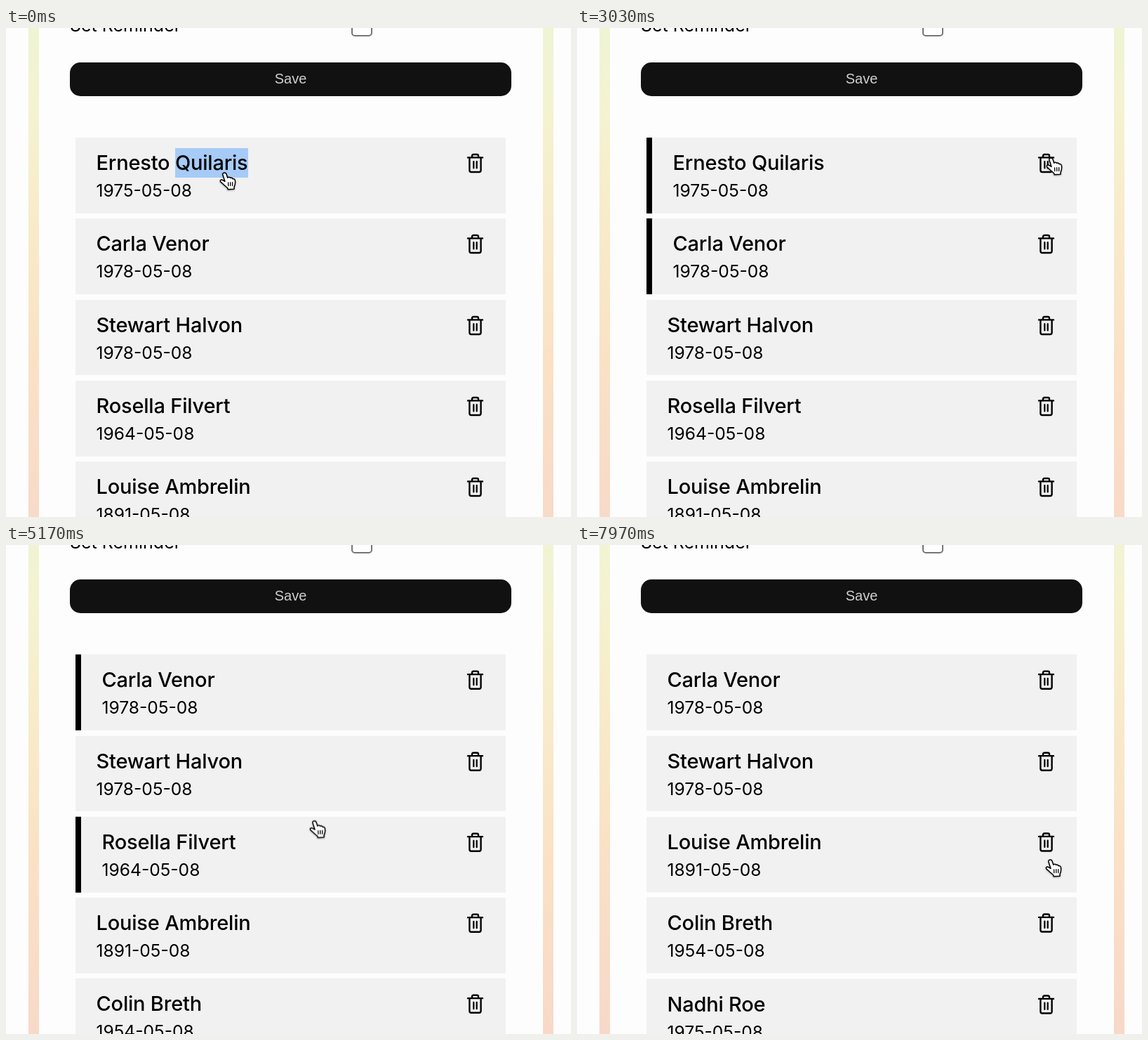
An HTML page for the animation above (8000 ms loop, 805 by 696 pixels).

```html
<!DOCTYPE html>
<html lang="en">
<head>
<meta charset="utf-8">
<title>Birthday list</title>
<style>
  html, body { margin: 0; width: 805px; height: 696px; overflow: hidden; }
  body { position: relative; background: #fdfdfd; color: #000; font-family: Inter, sans-serif; }
  body > * { position: absolute; }

  .strip {
    top: 0; width: 15.5px; height: 696px;
    background: linear-gradient(#eef4d4, #f4f3d1 12%, #f8eaca 33%, #fae1c6 53%, #f8dac8 77%, #f8d3c8) 0 0 / 100% 900px;
    animation: tint 8s step-end infinite;
  }
  .label { left: 91px; top: -22.5px; font-size: 25px; line-height: 36px; white-space: nowrap; }
  .box {
    left: 492px; top: -18px; width: 30px; height: 30px; box-sizing: border-box;
    border: 2px solid #767676; border-radius: 5px; background: #fff;
  }
  .save {
    left: 91px; top: 49px; width: 629px; height: 48px; border-radius: 15px;
    background: #111; color: #cfcfcf; text-align: center;
    font: 20px/47px "Liberation Sans", Arial, sans-serif;
  }

  .list { left: 98.5px; top: 156px; width: 613.5px; animation: shift1 8s step-end infinite; }
  .rest { animation: shift2 8s step-end infinite; }
  .card {
    position: relative; box-sizing: border-box; height: 107.75px; margin-bottom: 7.5px;
    padding-left: 30px; border-left: 0 solid #000; background: #f1f1f1;
    white-space: nowrap; overflow: hidden;
    animation: 8s step-end infinite;
  }
  .card b { display: block; padding-top: 15px; font-size: 29px; line-height: 42px; font-weight: 500; letter-spacing: -.2px; }
  .card i { display: block; margin-top: -1px; font-size: 24.6px; line-height: 38px; font-style: normal; }
  .card svg { position: absolute; right: 30px; top: 21px; width: 27px; height: 31px; }
  mark { display: inline-block; color: inherit; animation: deselect 8s step-end infinite; }

  .first { animation-name: on1, gone1; }
  .second { animation-name: on2; }
  .fourth { animation-name: on4, gone4; }

  .hand { left: 0; top: 0; width: 26px; height: 28px; overflow: visible; filter: drop-shadow(0 1px 1px #0005); animation: roam 8s linear infinite; }

  @keyframes tint {
    0% { background-position-y: 0; }
    41.62% { background-position-y: -25px; }
    93.74%, 100% { background-position-y: -50px; }
  }
  @keyframes shift1 { 0% { transform: none; } 41.62%, 100% { transform: translateY(-115.25px); } }
  @keyframes shift2 { 0% { transform: none; } 93.74%, 100% { transform: translateY(-115.25px); } }
  @keyframes gone1 { 0% { visibility: visible; } 41.62%, 100% { visibility: hidden; } }
  @keyframes gone4 { 0% { visibility: visible; } 93.74%, 100% { visibility: hidden; } }
  @keyframes on1 { 0% { border-left-width: 0; } .37%, 100% { border-left-width: 8px; } }
  @keyframes on2 { 0% { border-left-width: 0; } 23.37% { border-left-width: 8px; } 77.49%, 100% { border-left-width: 0; } }
  @keyframes on4 { 0% { border-left-width: 0; } 59.99%, 100% { border-left-width: 8px; } }
  @keyframes deselect { 0% { background: #a6cbf7; } 12.5%, 100% { background: transparent; } }

  @keyframes roam {
    0%, .375% { transform: translate(304px, 205px); animation-timing-function: ease-in-out; }
    17.125%, 27.5% { transform: translate(400px, 307px); animation-timing-function: ease-in-out; }
    34.625%, 36.25% { transform: translate(679px, 184px); animation-timing-function: ease-in-out; }
    37.875%, 41.625% { transform: translate(668px, 184px); animation-timing-function: cubic-bezier(.4, 0, .7, .8); }
    45.875% { transform: translate(505px, 359px); animation-timing-function: ease-out; }
    50.375%, 60% { transform: translate(436px, 424px); animation-timing-function: ease-in; }
    64.625% { transform: translate(432px, 392px); animation-timing-function: cubic-bezier(.3, .2, .5, 1); }
    69.125%, 80.375% { transform: translate(471px, 221px); animation-timing-function: cubic-bezier(.4, 0, .6, .9); }
    86.625% { transform: translate(635px, 413px); animation-timing-function: ease-out; }
    90%, 97.2% { transform: translate(667px, 416px); animation-timing-function: ease-in-out; }
    99.625%, 100% { transform: translate(667px, 447px); }
  }
</style>
</head>
<body>
  <svg width="0" height="0">
    <symbol id="bin" viewBox="0 0 27 31">
      <g fill="none" stroke="#000" stroke-width="2.4" stroke-linecap="round" stroke-linejoin="round">
        <path d="M3 7.4H24M5.4 7.4V25.6Q5.4 28 7.8 28H19.2Q21.6 28 21.6 25.6V7.4"/>
        <path d="M9 7V5Q9 3 11 3H16Q18 3 18 5V7"/>
        <path d="M11.3 13V22.5M15.7 13V22.5" stroke-width="2.2"/>
      </g>
    </symbol>
  </svg>

  <div class="strip" style="left:31.5px"></div>
  <div class="strip" style="left:764.5px"></div>
  <div class="label">Set Reminder</div>
  <div class="box"></div>
  <div class="save">Save</div>

  <div class="list">
    <div class="card first"><b>Ernesto <mark>Quilaris</mark></b><i>1975-05-08</i><svg><use href="#bin"/></svg></div>
    <div class="card second"><b>Carla Venor</b><i>1978-05-08</i><svg><use href="#bin"/></svg></div>
    <div class="card"><b>Stewart Halvon</b><i>1978-05-08</i><svg><use href="#bin"/></svg></div>
    <div class="card fourth"><b>Rosella Filvert</b><i>1964-05-08</i><svg><use href="#bin"/></svg></div>
    <div class="rest">
      <div class="card"><b>Louise Ambrelin</b><i>1891-05-08</i><svg><use href="#bin"/></svg></div>
      <div class="card"><b>Colin Breth</b><i>1954-05-08</i><svg><use href="#bin"/></svg></div>
      <div class="card"><b>Nadhi Roe</b><i>1975-05-08</i><svg><use href="#bin"/></svg></div>
    </div>
  </div>

  <svg class="hand" viewBox="0 0 26 28">
    <path fill="#fff" stroke="#000" stroke-width="1.5" stroke-linejoin="round"
      d="M6.2 1.2C8 .5 9.5 1.5 10 3L11.8 8.2C12.6 7 15 7 15.6 8.5C16.6 7.7 18.6 8.1 19 9.7C20.4 9.1 22 10 22.3 11.6C23 14 22.6 16 22.2 18L21 21.5V24.3L12.2 24.8L11.5 22.5C9 20.5 6 18 3.5 15.5C1.4 14.4 1 12.6 1.6 11.8C2.6 10.6 5 11 6.5 12.5L8 13.4L4.9 4C4.5 2.6 5 1.6 6.2 1.2Z"/>
    <path fill="none" stroke="#000" stroke-width="1.3" stroke-linecap="round" d="M12.6 14.8L12.8 19.6M15.7 14.7L15.8 19.6M18.7 14.6V19.6"/>
  </svg>
</body>
</html>
```
